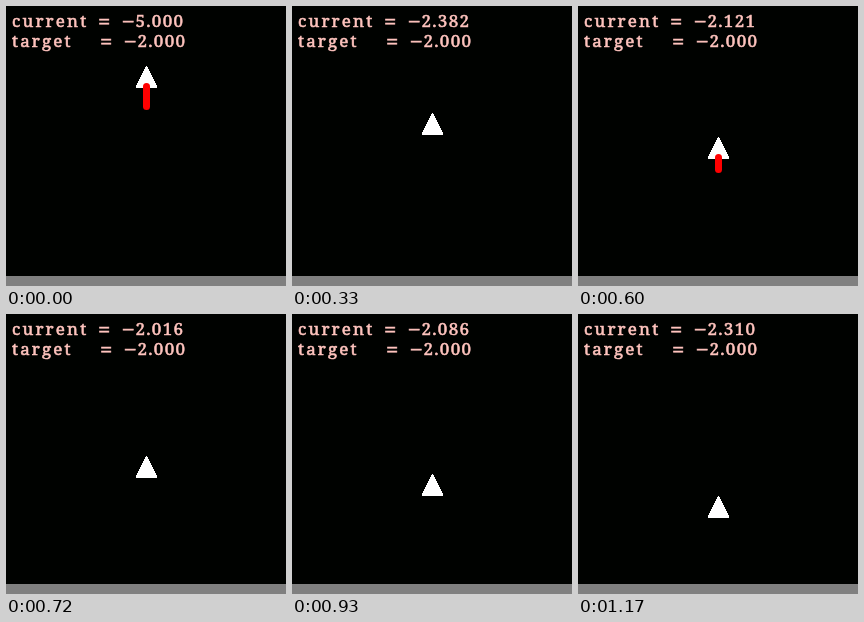
An HTML page with a canvas for the animation above (1.2 s loop, 280 px wide and 280 px high).

```html
<!DOCTYPE html>
<html lang="en">
<head>
<meta charset="utf-8">
<title>Descent speed control</title>
<style>
  html, body { margin: 0; width: 100%; height: 100%; overflow: hidden; background: #000200; }
  canvas { display: block; }
</style>
</head>
<body>
<canvas id="stage" width="280" height="280"></canvas>
<script>
const ctx = document.getElementById('stage').getContext('2d');
const STEP = 30, STEPS = 40, GRAVITY = 0.15, TARGET = -2, CX = 140;

// Height of the nose at a few steps, linear in between.
const path = [[0, 60], [6, 90], [11, 107], [20, 131], [27, 150], [31, 160], [39, 182]];

// The engine fires four steps out of seven; each pulse has its own thrust.
const thrust = [0.59865, 0.5427, 0.194, 0.085, 0.095, 0.094];
const pulse = step => Math.floor((step + 2) / 7);
const firing = step => (step + 2) % 7 < 4;

const speeds = [-5];
for (let i = 0; i < STEPS - 1; i++) {
  speeds.push(speeds[i] + (firing(i) ? thrust[pulse(i)] : -GRAVITY));
}

function noseY(step) {
  const i = Math.max(1, path.findIndex(([s]) => s >= step));
  const [s0, y0] = path[i - 1], [s1, y1] = path[i];
  return Math.round(y0 + (y1 - y0) * (step - s0) / (s1 - s0));
}

// A thin outline makes the regular weight heavier without widening it.
function text(str, x, y, size, spacing) {
  ctx.font = `${size}px "Noto Serif", serif`;
  ctx.letterSpacing = spacing + 'px';
  ctx.fillText(str, x, y);
  ctx.strokeText(str, x, y);
}

function readout(label, value, y, x) {
  ctx.fillStyle = ctx.strokeStyle = '#ffc4be';
  ctx.lineWidth = 0.6;
  text(label, 6, y, 17, 2.15);
  text('=', x - 0.5, y + 2, 22, 0);
  text('\u2212', x + 23.5, y + 2, 22, 0);
  text(Math.abs(value).toFixed(3), x + 37, y, 17, 1.3);
}

function rocket(step) {
  const y = noseY(step);
  // Filled row by row to keep the edges hard.
  ctx.fillStyle = '#fff';
  for (let row = 0; row <= 21; row++) {
    const half = Math.min(10, Math.round(row / 2));
    ctx.fillRect(CX - half, y + row, 2 * half + 1, 1);
  }
  if (!firing(step)) return;
  ctx.strokeStyle = '#f00';
  ctx.lineWidth = 7;
  ctx.lineCap = 'round';
  ctx.beginPath();
  ctx.moveTo(CX + 0.5, y + 20.5);
  ctx.lineTo(CX + 0.5, y + (pulse(step) < 2 ? 40.5 : 32.5));
  ctx.stroke();
}

function draw() {
  const step = Math.floor(performance.now() / STEP) % STEPS;
  ctx.fillStyle = '#000200';
  ctx.fillRect(0, 0, 280, 280);
  ctx.fillStyle = '#808080';
  ctx.fillRect(0, 270, 280, 10);
  readout('current', speeds[step], 21, 92.5);
  readout('target', TARGET, 41, 94.5);
  rocket(step);
  requestAnimationFrame(draw);
}
draw();
</script>
</body>
</html>
```
